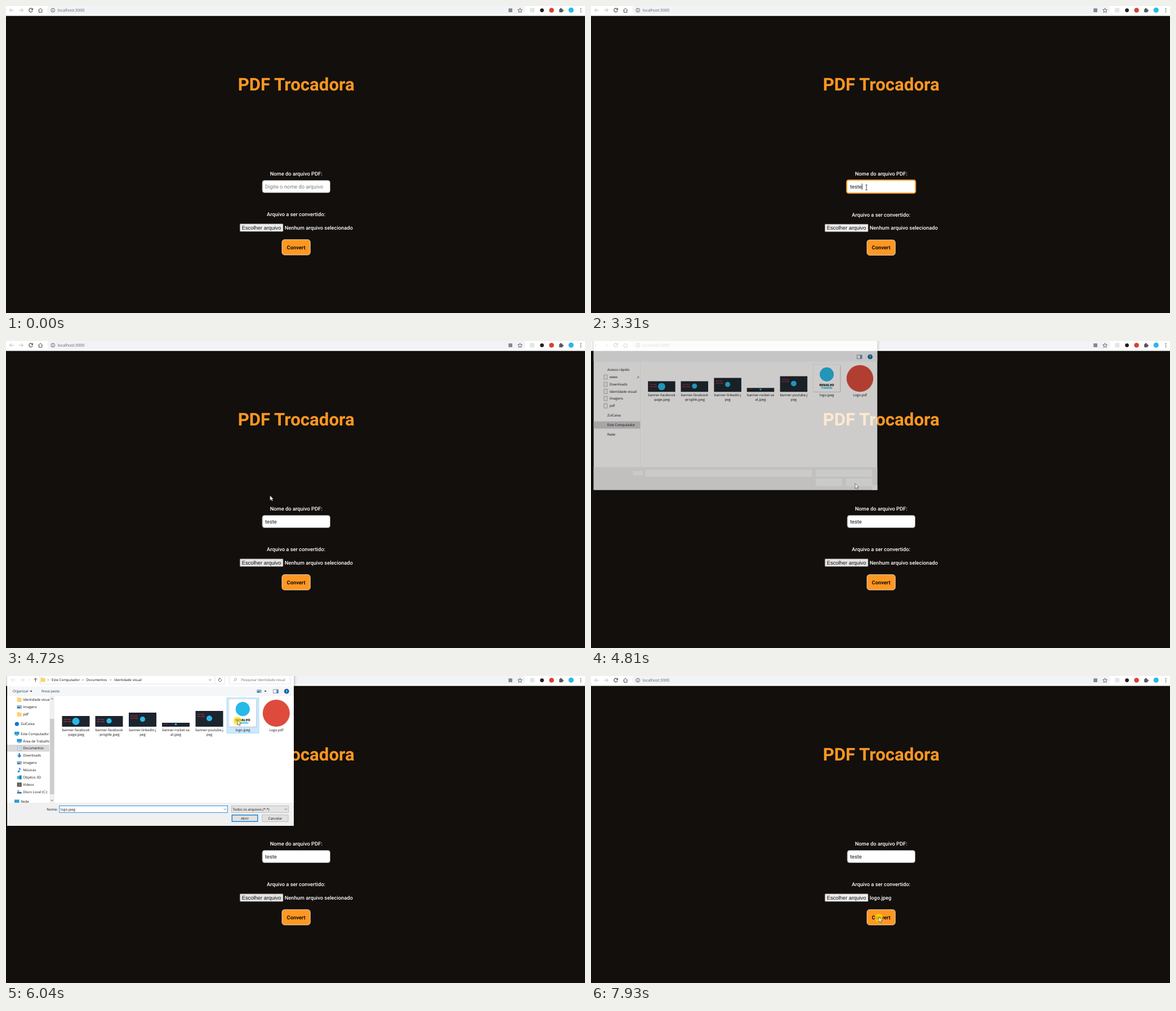
Recreate the animation shown at these times as an HTML page. Size 1028 by 545 pixels, loop 7.99 s.

```html
<!DOCTYPE html>
<html lang="pt-BR">
<head>
<meta charset="utf-8">
<title>PDF Trocadora</title>
<style>
  html, body { margin: 0; width: 100%; height: 100%; overflow: hidden; background: #120f0c; }
  svg { display: block; width: 1028px; height: 545px; text-rendering: geometricPrecision; }
  text { white-space: pre; }
  .page { font-family: Roboto, sans-serif; font-size: 9.3px; font-weight: 500; fill: #fff; }
  .ui { font-family: "Open Sans", "Noto Sans", sans-serif; font-size: 6.15px; fill: #111; }
  .shadow { filter: drop-shadow(0 2px 3px rgba(0, 0, 0, .35)); }
</style>
</head>
<body>
<svg id="stage" viewBox="0 0 1028 545"></svg>
<script>
const LOOP = 7990;
const ORANGE = '#ff9721', CYAN = '#27b9e8', BLUE = '#0078d7';
const stage = document.getElementById('stage');

function el(parent, tag, attrs = {}, content) {
  const node = document.createElementNS('http://www.w3.org/2000/svg', tag);
  set(node, attrs);
  if (content !== undefined) node.textContent = content;
  parent.appendChild(node);
  return node;
}
function set(node, attrs) {
  for (const key in attrs) node.setAttribute(key, attrs[key]);
}
const group = (p, attrs) => el(p, 'g', attrs);
const rect = (p, x, y, x2, y2, fill, more) =>
  el(p, 'rect', { x, y, width: x2 - x, height: y2 - y, fill, ...more });
const dot = (p, cx, cy, r, fill) => el(p, 'circle', { cx, cy, r, fill });
const line = (p, d, stroke, width = 1, more) =>
  el(p, 'path', { d, stroke, 'stroke-width': width, fill: 'none', ...more });
const text = (p, x, y, s, more) => el(p, 'text', { x, y, ...more }, s);
const mid = { 'text-anchor': 'middle' };
const show = (node, on) => node.setAttribute('visibility', on ? 'visible' : 'hidden');
const within = (t, a, b) => t >= a && t < b;
const progress = (t, a, b) => Math.min(1, Math.max(0, (t - a) / (b - a)));
const blink = (t, start) => Math.floor((t - start) / 530) % 2 === 0;

// Page
const page = group(stage, { class: 'page' });
rect(page, 0, 0, 1028, 545, '#120f0c');
const upper = group(page);
text(upper, 515.2, 150.3, 'PDF Trocadora', { ...mid, 'font-size': 31.2, 'font-weight': 700, fill: ORANGE });
text(upper, 515.2, 301.2, 'Nome do arquivo PDF:', mid);

const field = rect(page, 455, 309.5, 575.5, 331.5, '#fff', { rx: 4, stroke: '#858585' });
const fieldFocus = rect(page, 454, 309, 576.2, 332.2, '#fff', { rx: 3.5, stroke: ORANGE, 'stroke-width': 2 });
const typed = text(page, 460, 323.9, '', { 'font-size': 9.3, 'font-weight': 400 });
const caret = line(page, 'M0 315.3V326', '#111', 0.9);

const lower = group(page);
text(lower, 515, 373.2, 'Arquivo a ser convertido:', mid);
const choose = rect(lower, 415.3, 386.8, 492, 400.3, '#efefef', { rx: 1, stroke: '#767676', 'stroke-width': 0.6 });
text(lower, 453.6, 396.6, 'Escolher arquivo', {
  ...mid, 'font-family': 'Liberation Sans, Arial, sans-serif', 'font-size': 9.4, 'font-weight': 400, fill: '#111' });
const fileName = text(lower, 494.7, 396.5, '');
rect(lower, 490, 414.8, 540.2, 441.9, ORANGE, { rx: 4.5, stroke: '#f6e3cc', 'stroke-width': 0.9 });
text(lower, 515.1, 431.6, 'Convert', { ...mid, 'font-size': 9.3, 'font-weight': 700, fill: '#120f0c' });

const suggest = group(stage, { class: 'ui' });
rect(suggest, 453, 333.8, 577, 361.3, '#fff', { rx: 1.5 });
text(suggest, 459.7, 349.9, 'README-pt-br.md', { 'font-size': 7 });

// Browser bar
const bar = group(stage, { class: 'ui' });
rect(bar, 0, 0, 1028, 17.6, '#fff');
rect(bar, 73, -2, 922, 14.8, '#f1f3f4', { rx: 8 });
const arrowLeft = 'M14 7.5H6.5M10 4L6.5 7.5L10 11';
line(bar, arrowLeft, '#b4b6b9', 0.9);
line(bar, arrowLeft, '#b4b6b9', 0.9, { transform: 'translate(37 0) scale(-1 1)' });
line(bar, 'M46.6 5.2A3.3 3.3 0 1 0 47.2 8.6M47.4 4V6.6H44.8', '#44474b', 1.1);
line(bar, 'M57.4 7.7L61.2 4L65 7.7M58.6 7V11.3H63.8V7', '#44474b', 1);
line(bar, 'M83.2 7V9.6M83.2 5.2V6.2', '#44474b', 0.9);
el(bar, 'circle', { cx: 83.2, cy: 7.5, r: 3.4, fill: 'none', stroke: '#44474b', 'stroke-width': 0.8 });
text(bar, 91.5, 10, 'localhost:3000', { 'font-size': 7.1, fill: '#5f6368' });
rect(bar, 892.2, 4.2, 899, 11, '#85888c', { rx: 0.8 });
line(bar, 'M912.6 3.8L913.7 6.5L916.5 6.7L914.4 8.6L915 11.4L912.6 9.9L910.2 11.4L910.8 8.6L908.7 6.7L911.5 6.5Z', '#55585c', 0.9);
rect(bar, 930.3, 3.6, 938.3, 11.4, '#e3e5e6', { rx: 1 });
dot(bar, 951.6, 7.6, 3.4, '#2a1a1a');
dot(bar, 968.6, 7.5, 4.3, '#d8412f');
rect(bar, 982.2, 5.2, 988.4, 11.2, '#55585c', { rx: 0.8 });
dot(bar, 985.2, 4.8, 1.4, '#55585c');
dot(bar, 988.8, 8, 1.3, '#55585c');
dot(bar, 1003.3, 7.3, 4.6, CYAN);
for (const y of [4.5, 7.5, 10.5]) dot(bar, 1020.6, y, 0.85, '#44474b');

// File dialog
const dialog = group(stage, { class: 'ui' });
rect(dialog, 2, -40, 511, 266, '#fff', { class: 'shadow' });
const early = group(dialog), late = group(dialog), files = group(dialog);

const icons = {
  doc: (g) => rect(g, -3, -4, 3, 4, '#f7f7f7', { stroke: '#888', 'stroke-width': 0.6 }),
  folder: (g) => el(g, 'path', { d: 'M-4 -4H0L1 -3H4V4H-4Z', fill: '#f8d573' }),
  image: (g) => { rect(g, -4.3, -3, 4.3, 3, '#8fb7d6'); rect(g, -3.5, 0, 1, 2.2, '#4d6f83'); },
  cloud: (g) => dot(g, 0, 0, 3.6, '#1177cc'),
  screen: (g) => { rect(g, -4.3, -3.5, 4.3, 2, '#2f9bd8'); rect(g, -2.2, 2.6, 2.2, 3.5, '#56758a'); },
  page: (g) => { rect(g, -3, -4, 3, 4, '#eef3f7', { stroke: '#8797a5', 'stroke-width': 0.6 }); line(g, 'M-1.5 -1.5H1.5M-1.5 0H1.5M-1.5 1.5H1.5', '#5b8db8', 0.6); },
  down: (g) => el(g, 'path', { d: 'M-1.4 -4H1.4V-.5H4L0 4L-4 -.5H-1.4Z', fill: '#2b83d4' }),
  note: (g) => { line(g, 'M0 2.5V-4Q1 -2 3 -1', '#1686d9', 1.2); dot(g, -1.3, 2.6, 1.7, '#1686d9'); },
  cube: (g) => { rect(g, -4, -2.5, 2, 3, '#35b4e5'); rect(g, 0, -3.5, 4, 3.5, '#1c83bd'); },
  film: (g) => { rect(g, -4, -3.7, 4, 3.7, '#4a4d55'); rect(g, -2, -2.5, 2, 2.5, '#8b6f55'); },
  disk: (g) => { rect(g, -4, 0, 4, 2.8, '#5b6670'); rect(g, -3.5, -2.7, 0, -1, '#2f9bd8'); },
};
function row(p, iconX, textX, y, kind, label) {
  if (kind) icons[kind](group(p, { transform: `translate(${iconX} ${y})` }));
  text(p, textX, y + 2.2, label);
}

// First state: empty controls and the quick list
rect(early, 2, 17, 511, 36, '#f5f6f7');
rect(early, 2, 143, 86, 156, '#cfcfd1');
rect(early, 85.6, 36, 86.2, 225, '#ececec');
rect(early, 2, 225, 511, 266, '#f0f0f0');
[[72, 232, 91, 240], [94.5, 230, 394, 242.3], [400.5, 230, 501.5, 242.3], [400.5, 245.5, 447.5, 259],
 [454.5, 245.5, 501.5, 259], [501.5, 257, 511, 266]]
  .forEach(([a, b, c, d]) => rect(early, a, b, c, d, '#fcfcfc'));
[[50.2, '', 'Acesso rápido'], [63.5, 'doc', 'www'], [76.6, 'doc', 'Downloads'], [89.2, 'doc', 'Identidade visual'],
 [102, 'doc', 'Imagens'], [115.1, 'doc', 'pdf'], [132.2, '', 'ZulCaixa'], [149.4, '', 'Este Computador'], [166.6, '', 'Rede']]
  .forEach(([y, kind, label]) => row(early, 23.5, kind ? 30.5 : 26.5, y, kind, label));
line(early, 'M79.5 66L82 63.5M81 61.5L84 64.5', '#555', 0.9);

// Loaded state
const tool = { fill: '#1f3a63' };
line(late, 'M17 7H9.5M12.5 4L9.5 7L12.5 10M25 7H32.5M29.5 4L32.5 7L29.5 10', '#d2d2d2', 0.8);
line(late, 'M39.5 6L41 7.5L42.5 6', '#c4c4c4', 0.7);
line(late, 'M52.4 10.5V4M49.8 6.7L52.4 4L55 6.7', '#333', 0.9);
line(late, 'M60.5 -2V14.2H388.5V-2M371 -2V14.2M396 -2V14.2H504.5V-2', '#d9d9d9', 0.7);
icons.folder(group(late, { transform: 'translate(65.7 6.8)' }));
[[81, 'Este Computador'], [142.5, 'Documentos'], [192, 'Identidade visual']].forEach(([x, s]) => {
  line(late, `M${x - 7} 5.3L${x - 5.4} 7L${x - 7} 8.7`, '#555', 0.7);
  text(late, x, 9.1, s);
});
line(late, 'M360.5 6L362.5 8L364.5 6', '#444', 0.8);
line(late, 'M382 5.6A2.6 2.6 0 1 1 379.4 4.6M379 3L380.8 4.6L379 6', '#444', 0.8);
line(late, 'M403.5 10L406 7.6M409.5 6A1.9 1.9 0 1 0 405.7 6A1.9 1.9 0 1 0 409.5 6', '#888', 0.7);
text(late, 417.5, 9.1, 'Pesquisar Identidade visual', { fill: '#6d6d6d' });
rect(late, 2, 18.5, 511, 36, '#f5f6f7');
text(late, 12, 29.2, 'Organizar', tool);
text(late, 63, 29.2, 'Nova pasta', tool);
const down = (x, y, fill) => el(late, 'path', { d: `M${x - 2} ${y}h4l-2 2.4z`, fill });
down(44.5, 26, '#222');
down(460.5, 26, '#222');
icons.image(group(late, { transform: 'translate(449.5 27)' }));

const side = group(late);
const clip = el(el(stage, 'defs'), 'clipPath', { id: 'side' });
rect(clip, 2, 36, 77.3, 225, '#fff');
side.setAttribute('clip-path', 'url(#side)');
rect(side, 2, 122, 77.3, 134.3, '#d9d9d9');
[[42, 'folder', 'Identidade visual'], [55, 'image', 'Imagens'], [68, 'folder', 'pdf'], [85.2, 'cloud', 'ZulCaixa', 1],
 [102.4, 'screen', 'Este Computador', 1], [115.3, 'screen', 'Área de Trabalho'], [128.2, 'page', 'Documentos'],
 [141.2, 'down', 'Downloads'], [154.1, 'image', 'Imagens'], [167, 'note', 'Músicas'], [180, 'cube', 'Objetos 3D'],
 [192.9, 'film', 'Vídeos'], [205.8, 'disk', 'Disco Local (C:)'], [223, 'screen', 'Rede', 1]]
  .forEach(([y, kind, label, top]) => row(side, top ? 19.3 : 23.7, top ? 26.3 : 30.3, y, kind, label));
rect(late, 77.5, 36, 86, 225, '#f0f0f0');
rect(late, 78, 76, 85.6, 210, '#cdcdcd');
line(late, 'M79.8 41.5L81.8 39.5L83.8 41.5M79.8 219.8L81.8 221.8L83.8 219.8', '#444', 0.9);
rect(late, 2, 225, 511, 266, '#f0f0f0');
text(late, 91.5, 238.8, 'Nome:', { 'text-anchor': 'end' });
rect(late, 94.8, 230.5, 393.6, 242.3, '#fff', { stroke: BLUE, 'stroke-width': 0.8 });
const pickedName = text(late, 97, 238.8, 'logo.jpeg');
const nameCaret = line(late, 'M97.2 232.4V240.6', '#111', 0.7);
rect(late, 400.5, 230.5, 501.3, 242.3, '#e3e3e3', { stroke: '#adadad', 'stroke-width': 0.7 });
text(late, 402.5, 238.8, 'Todos os arquivos (*.*)');
line(late, 'M387 235.5L389 237.5L391 235.5M494.8 235.5L496.8 237.5L498.8 235.5', '#444', 0.8);
rect(late, 401.3, 246.8, 446.8, 258.3, '#e1e1e1', { stroke: BLUE, 'stroke-width': 1.3 });
text(late, 424, 254.7, 'Abrir', mid);
rect(late, 454.8, 246.6, 501, 258.6, '#e1e1e1', { stroke: '#adadad', 'stroke-width': 0.7 });
const cancelHover = rect(late, 454.8, 246.6, 501, 258.6, '#e5f1fb', { stroke: BLUE, 'stroke-width': 0.8 });
text(late, 478, 254.7, 'Cancelar', mid);
for (const [x, y] of [[509, 264], [507, 264], [509, 262]]) dot(late, x, y, 0.5, '#aaa');

// Shared toolbar symbols and file list
rect(files, 474.8, 24, 483.5, 30.3, '#fff', { stroke: '#4b5d75', 'stroke-width': 0.7 });
rect(files, 480, 24.5, 483, 30, '#4a90d0');
dot(files, 498.2, 27.1, 4.4, '#0b62a8');
text(files, 498.2, 29.5, '?', { ...mid, fill: '#fff', 'font-weight': 700 });
const pick = rect(files, 392, 38.8, 449, 101.6, '#cce8ff', { stroke: '#99d1ff', 'stroke-width': 0.7 });
[[124, 71, 'banner-facebook', '-page.jpeg', 6.5], [183, 71, 'banner-facebook', '-progiile.jpeg', 4.6],
 [242.5, 65, 'banner-linkedin.j', 'peg', 4.6], [301.5, 83, 'banner-rocket-se', 'at.jpeg', 1.8],
 [361, 62, 'banner-youtube.j', 'peg', 5]].forEach(([x, top, a, b, r]) => {
  rect(files, x - 24.5, top, x + 24.5, 90, '#1c252e');
  dot(files, x, (top + 90) / 2 - (r < 6 ? 0.8 : 0), r, CYAN);
  const tiny = { 'font-size': r < 2 ? 1.8 : 3.2, 'font-weight': 700, fill: '#d83a58' };
  const y = top + (r < 2 ? 3 : 7);
  text(files, x - 21.5, y, 'crio seu', tiny);
  if (r > 2) text(files, x - 21.5, y + 4, 'site web', tiny);
  text(files, x, 98.3, a, mid);
  text(files, x, 106.3, b, mid);
});
rect(files, 396.6, 41.7, 445.2, 90.8, '#b5b5b5');
rect(files, 396, 41, 444.3, 90, '#fff', { stroke: '#dedede', 'stroke-width': 0.5 });
dot(files, 420.3, 58.7, 12.6, CYAN);
const brand = { ...mid, 'font-size': 5.5, 'font-weight': 800 };
text(files, 420.3, 79.7, 'RENALVO', brand);
text(files, 420.3, 85, 'TIMARI', { ...brand, fill: CYAN });
text(files, 420.5, 98.3, 'logo.jpeg', mid);
dot(files, 479.8, 66, 24, '#de4b3d');
text(files, 480, 98.3, 'Logo.pdf', mid);

// Pointer
const pointer = group(stage);
const glow = dot(pointer, 0, 1.5, 7.2, '#ffdc00');
glow.setAttribute('opacity', 0.72);
const arrow = el(pointer, 'path', {
  d: 'M0 0V9L2.1 7.1L3.5 10.2L5 9.5L3.6 6.5H6.4Z', fill: '#fff', stroke: '#222', 'stroke-width': 0.6 });
const beam = line(pointer, 'M-1.8 -4.5Q0 -4.5 0 -3.5V3.8Q0 4.8 -1.8 4.8M1.8 -4.5Q0 -4.5 0 -3.5M0 3.8Q0 4.8 1.8 4.8', '#111', 0.8);
const spinner = group(pointer);
el(spinner, 'circle', { r: 4, fill: 'none', stroke: '#0f5ca8', 'stroke-width': 2.2 });
const spinArc = line(spinner, 'M0 -4A4 4 0 0 1 4 0', '#5fc0ff', 2.2);

const path = [
  [400, 1017, 536], [1190, 493, 328], [1300, 489, 322], [3310, 489, 322], [3820, 469, 389],
  [3970, 467, 391.5], [4450, 467, 391.5], [4810, 469, 253], [5040, 468, 250], [5190, 386, 166],
  [5380, 378, 146], [5840, 411, 78], [6940, 411, 80], [7470, 515, 416], [7700, 511, 428], [7990, 511, 428],
];
function pointerAt(t) {
  const i = Math.max(1, path.findIndex((p) => p[0] > t));
  const [t0, x0, y0] = path[i - 1], [t1, x1, y1] = path[i];
  const p = progress(t, t0, t1);
  const k = i === 1 ? 1 - (1 - p) ** 2 : p * p * (3 - 2 * p);
  return [x0 + (x1 - x0) * k, y0 + (y1 - y0) * k];
}

const keys = [[2390, 't'], [2590, 'te'], [2720, 'tes'], [2900, 'test'], [2950, 'teste']];
const clicks = [[1490, 1620], [4230, 4400], [5920, 6080], [6640, 6720], [7910, 7990]];

function drawForm(t) {
  const focus = within(t, 1500, 4250);
  show(field, !focus);
  show(fieldFocus, focus);
  upper.setAttribute('transform', `translate(0 ${focus ? -0.5 : 0})`);
  lower.setAttribute('transform', `translate(0 ${focus ? 0.5 : 0})`);
  show(suggest, within(t, 1560, 2390));

  const key = keys.filter((k) => k[0] <= t).pop();
  typed.textContent = key ? key[1] : 'Digite o nome do arquivo';
  typed.setAttribute('fill', key ? '#1c1c1c' : '#7b7b7b');
  show(caret, focus && blink(t, key ? key[0] : 1500));
  caret.setAttribute('transform', `translate(${460.5 + (key ? typed.getComputedTextLength() : 0)} 0)`);

  choose.setAttribute('fill', within(t, 3720, 6780) && !within(t, 4230, 4400) ? '#e5e5e5' : '#efefef');
  fileName.textContent = t < 6780 ? 'Nenhum arquivo selecionado' : 'logo.jpeg';
}

function drawDialog(t) {
  const opening = 1 - (1 - progress(t, 4757, 4857)) ** 2;
  const alpha = opening - progress(t, 6780, 6920);
  const scale = 0.95 + 0.05 * alpha;
  show(dialog, alpha > 0);
  set(dialog, { opacity: alpha, transform: `translate(256.5 113) scale(${scale}) translate(-256.5 -113)` });
  const loaded = t >= 4860;
  early.setAttribute('display', loaded ? 'none' : 'inline');
  late.setAttribute('display', loaded ? 'inline' : 'none');
  const chosen = t >= 5940;
  pick.setAttribute('opacity', chosen ? 1 : t > 5700 ? 0.5 : 0);
  pickedName.setAttribute('opacity', chosen ? 1 : 0);
  nameCaret.setAttribute('opacity', !chosen && blink(t, 4860) ? 1 : 0);
  cancelHover.setAttribute('opacity', 1 - progress(t, 5080, 5380));
}

function drawPointer(t) {
  const [x, y] = pointerAt(t);
  const overField = within(x, 454, 577) && within(y, 308, 333) && t < 4250;
  const busy = within(t, 6740, 6960);
  const visible = t >= 400 && !within(t, 2390, 3310);
  pointer.setAttribute('transform', `translate(${x} ${y})`);
  show(arrow, visible && !overField && !busy);
  show(beam, visible && overField);
  show(spinner, busy);
  spinArc.setAttribute('transform', `rotate(${t * 0.4})`);
  show(glow, clicks.some(([a, b]) => within(t, a, b)));
}

const start = performance.now();
function frame() {
  const t = (performance.now() - start) % LOOP;
  drawForm(t);
  drawDialog(t);
  drawPointer(t);
  requestAnimationFrame(frame);
}
frame();
</script>
</body>
</html>
```
